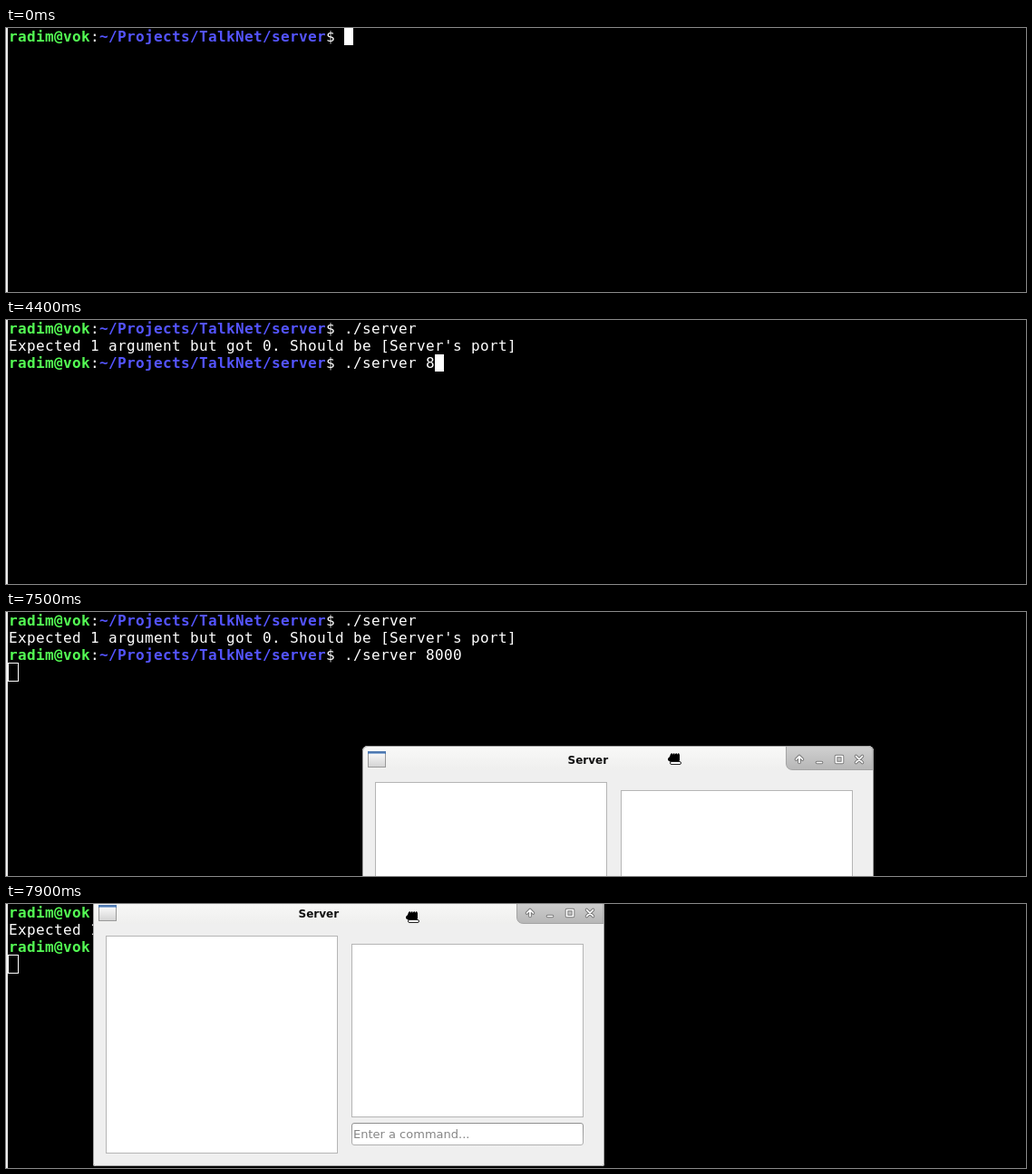
Animation, 1125 px wide and 292 px high, one loop 8000 ms. Source, as an HTML page with a canvas:

```html
<!DOCTYPE html>
<html lang="en">
<head>
<meta charset="utf-8">
<title>Terminal session</title>
<style>
  html, body { margin: 0; width: 100%; height: 100%; overflow: hidden; background: #000; }
  canvas { display: block; }
</style>
</head>
<body>
<canvas id="stage" width="1125" height="292"></canvas>
<script>
const ctx = document.getElementById('stage').getContext('2d');
const LOOP = 8000, CELL = 10, ROW = 19, LEFT = 3;
const GREEN = '#54ff54', BLUE = '#5454ff', WHITE = '#fff';
const MONO = '"DejaVu Sans Mono", monospace';
const SANS = '"DejaVu Sans", sans-serif';
const PROMPT_END = 37;

const firstKeys = [300, 500, 1400, 1600, 1800, 2100, 2400, 2600];
const secondKeys = [4100, 4400, 4700, 4900, 5200];
const RECALL = 3500, ENTER_1 = 2900, ENTER_2 = 5800, BLUR = 5900;

// Drag waypoints, 200 ms apart: window x, y, pointer x, y
const DRAG_START = 7300, DRAG_STEP = 200;
const drag = [
  [628, 281, 970, 295],
  [393, 148, 737, 162],
  [186, 27, 523, 40],
  [96, -5, 448, 14]
];

const pressed = (keys, t) => keys.filter(k => t >= k).length;

function rect(x, y, w, h, color) {
  ctx.fillStyle = color;
  ctx.fillRect(x, y, w, h);
}

function frame(x, y, w, h, color) {
  ctx.strokeStyle = color;
  ctx.lineWidth = 1;
  ctx.strokeRect(x + 0.5, y + 0.5, w - 1, h - 1);
}

function shade(y0, y1, top, bottom) {
  const g = ctx.createLinearGradient(0, y0, 0, y1);
  g.addColorStop(0, top);
  g.addColorStop(1, bottom);
  return g;
}

function label(text, x, y, font, color) {
  ctx.font = font;
  ctx.fillStyle = color;
  ctx.fillText(text, x, y);
}

// Terminal text sits on a fixed cell grid
function print(text, col, row, color = WHITE, bold = false) {
  ctx.font = `${bold ? 'bold ' : ''}16px ${MONO}`;
  ctx.fillStyle = color;
  [...text].forEach((ch, i) => ctx.fillText(ch, LEFT + (col + i) * CELL, row * ROW + 15));
}

function prompt(row, command) {
  print('radim@vok', 0, row, GREEN, true);
  print(':', 9, row);
  print('~/Projects/TalkNet/server', 10, row, BLUE, true);
  print('$', 35, row);
  print(command, PROMPT_END, row);
}

function block(col, row) {
  rect(LEFT + col * CELL, row * ROW, CELL, ROW, WHITE);
}

function terminal(t) {
  rect(0, 0, 1125, 292, '#000');
  rect(0, 0, 2, 292, '#eee');

  const first = './server'.slice(0, pressed(firstKeys, t));
  prompt(0, first);
  if (t < ENTER_1) return block(PROMPT_END + first.length, 0);

  print("Expected 1 argument but got 0. Should be [Server's port]", 0, 1);
  const count = t < RECALL ? 0 : 8 + pressed(secondKeys, t);
  prompt(2, './server 8000'.slice(0, count));
  if (t < ENTER_2) block(PROMPT_END + count, 2);
  else if (t < BLUR) block(0, 3);
  else frame(2, 56, 12, 21, WHITE);
}

function lines(...paths) {
  ctx.beginPath();
  for (const [x, y, ...rest] of paths) {
    ctx.moveTo(x, y);
    for (let i = 0; i < rest.length; i += 2) ctx.lineTo(rest[i], rest[i + 1]);
  }
}

// White glyph with a dark rim
function glyph(...paths) {
  lines(...paths);
  ctx.lineCap = ctx.lineJoin = 'round';
  for (const [width, color] of [[3.6, '#777'], [1.7, '#fff']]) {
    ctx.lineWidth = width;
    ctx.strokeStyle = color;
    ctx.stroke();
  }
  ctx.lineCap = 'butt';
  ctx.lineJoin = 'miter';
}

function buttons() {
  ctx.beginPath();
  ctx.moveTo(467.5, 1);
  ctx.lineTo(467.5, 20);
  ctx.quadraticCurveTo(468, 26.5, 475, 26.5);
  ctx.lineTo(563, 26.5);
  ctx.lineTo(563, 1);
  ctx.fillStyle = shade(1, 27, '#d0d0d0', '#b6b6b6');
  ctx.fill();
  ctx.lineWidth = 1;
  ctx.strokeStyle = '#a4a4a4';
  ctx.stroke();

  glyph([482, 18.5, 482, 11.5], [478.5, 15, 482, 11.5, 485.5, 15]);
  glyph([501.5, 18.5, 506.5, 18.5]);
  glyph([522.5, 11.5, 529.5, 11.5, 529.5, 18.5, 522.5, 18.5, 522.5, 11.5]);
  glyph([544.5, 11.5, 551.5, 18.5], [551.5, 11.5, 544.5, 18.5]);
}

function icon() {
  rect(6, 6, 20, 18, shade(6, 24, '#fff', '#d2d2d2'));
  frame(6, 6, 20, 18, '#999');
  rect(6, 6, 20, 3, '#4d78b0');
  rect(7, 8, 18, 1, '#8eaed6');
}

function appWindow(x, y) {
  ctx.save();
  ctx.translate(x, y);
  ctx.beginPath();
  ctx.roundRect(0, 0, 564, 295, [6, 6, 2, 2]);
  ctx.save();
  ctx.clip();
  rect(0, 0, 564, 295, '#efefef');
  rect(0, 0, 564, 27, shade(0, 27, '#f9f9f8', '#efefee'));
  buttons();
  ctx.restore();
  ctx.beginPath();
  ctx.roundRect(0.5, 0.5, 563, 294, [5.5, 5.5, 2, 2]);
  ctx.lineWidth = 1;
  ctx.strokeStyle = '#a3a3a3';
  ctx.stroke();

  icon();
  label('Server', 226.5, 20, `bold 12px ${SANS}`, '#111');

  for (const [bx, by, h] of [[14, 40, 241], [285, 49, 192]]) {
    rect(bx, by, 256, h, '#fff');
    frame(bx, by, 256, h, '#b5b5b5');
  }
  ctx.beginPath();
  ctx.roundRect(285.5, 247.5, 255, 24, 2.5);
  ctx.fillStyle = '#fff';
  ctx.fill();
  ctx.strokeStyle = shade(247, 272, '#909090', '#b0b0b0');
  ctx.stroke();
  label('Enter a command...', 287, 264, `13px ${SANS}`, '#858585');
  ctx.restore();
}

// Closed grabbing hand
function hand(x, y) {
  ctx.save();
  ctx.translate(x, y);
  ctx.beginPath();
  ctx.moveTo(-7, 0);
  ctx.lineTo(-5, -2);
  for (let fx = -4; fx < 6; fx += 2.5) {
    ctx.lineTo(fx, -5);
    ctx.lineTo(fx + 1.5, -6);
    ctx.lineTo(fx + 2.5, -4);
  }
  ctx.lineTo(6, 2);
  ctx.lineTo(5, 4);
  ctx.lineTo(-4, 4);
  ctx.lineTo(-7, 2);
  ctx.closePath();
  ctx.lineWidth = 1.5;
  ctx.strokeStyle = '#fff';
  ctx.stroke();
  ctx.fillStyle = '#000';
  ctx.fill();
  ctx.beginPath();
  ctx.roundRect(-4.5, 3.5, 12, 3, 1.5);
  ctx.fillStyle = '#fff';
  ctx.fill();
  ctx.lineWidth = 1;
  ctx.strokeStyle = '#222';
  ctx.stroke();
  ctx.restore();
}

// Catmull-Rom through the waypoints, extended straight at both ends
function along(axis, u) {
  const last = drag.length - 1;
  const at = i => i < 0 ? 2 * drag[0][axis] - drag[1][axis]
    : i > last ? 2 * drag[last][axis] - drag[last - 1][axis]
    : drag[i][axis];
  const i = Math.floor(u), f = u - i;
  const [a, b, c, d] = [i - 1, i, i + 1, i + 2].map(at);
  return Math.round(b + f / 2 * (c - a + f * (2 * a - 5 * b + 4 * c - d + f * (3 * (b - c) + d - a))));
}

function draw(now) {
  const t = Math.floor((now % LOOP) / 100) * 100;
  terminal(t);
  if (t >= DRAG_START) {
    const u = (t - DRAG_START) / DRAG_STEP;
    const [wx, wy, px, py] = [0, 1, 2, 3].map(axis => along(axis, u));
    appWindow(wx, wy);
    hand(px, py);
  }
}

const start = performance.now();
function tick() {
  draw(performance.now() - start);
  requestAnimationFrame(tick);
}
tick();
</script>
</body>
</html>
```
